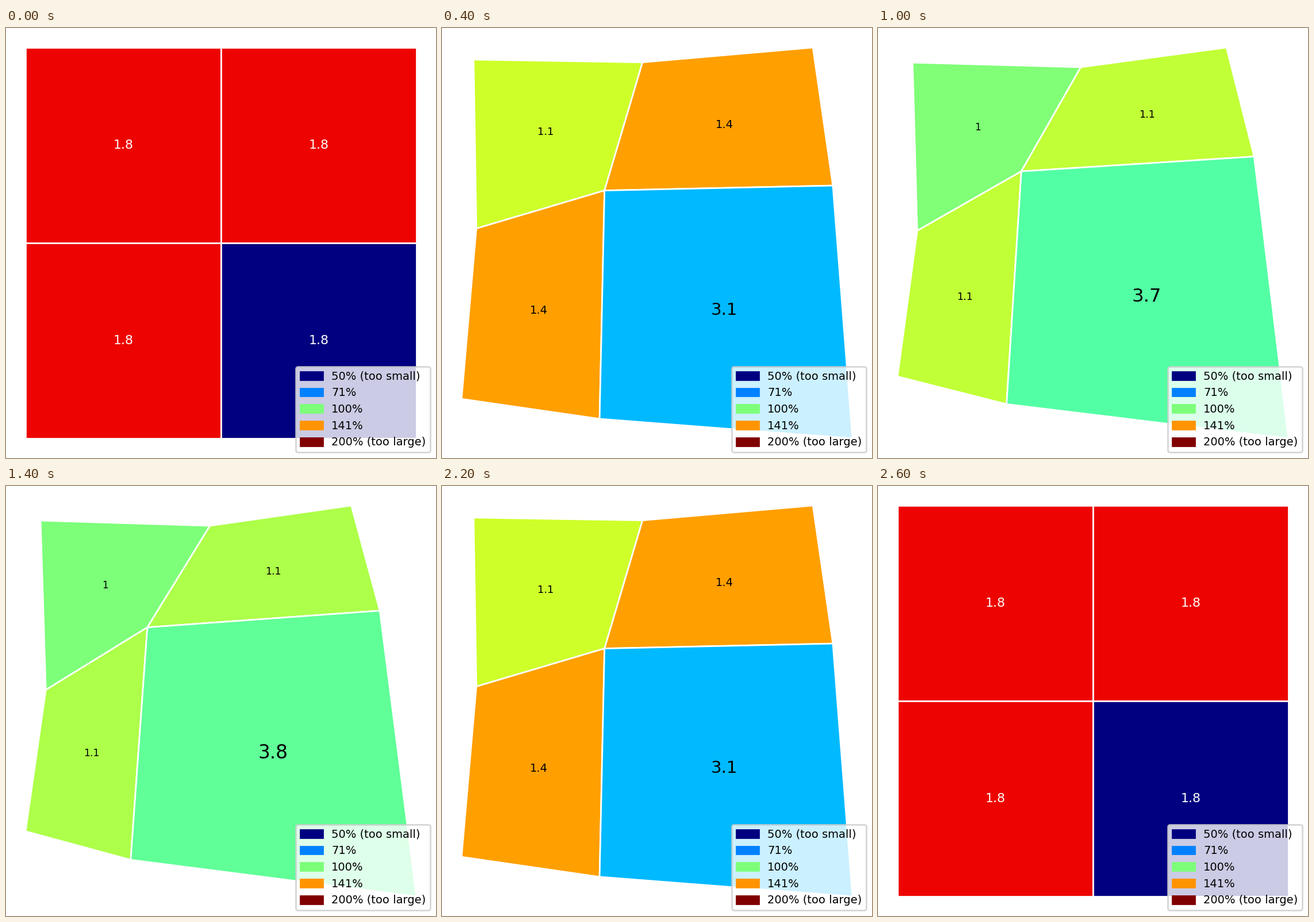
A matplotlib script for the animation above (2.7 s loop, 748 by 748 pixels).

```python
import numpy as np
import matplotlib.pyplot as plt
from matplotlib.animation import FuncAnimation
from matplotlib.patches import Patch, Polygon

plt.rcParams["font.family"] = "DejaVu Sans"

SIZE, DPI = 748, 200
STEPS = 13
WEIGHTS = np.array([1, 1, 1, 4])

# 3 x 3 grid of shared corners, row by row from the bottom left
GRID = np.array([(x, y) for y in (-1, 0, 1) for x in (-1, 0, 1)], float)
# upper left, upper right, lower left, lower right
CELLS = [[c, c + 1, c + 4, c + 3] for c in (3, 4, 0, 1)]


def area_centroid(ring):
    nxt = np.roll(ring, -1, axis=0)
    cross = ring[:, 0] * nxt[:, 1] - nxt[:, 0] * ring[:, 1]
    area = cross.sum() / 2
    return area, ((ring + nxt) * cross[:, None]).sum(axis=0) / (6 * area)


def measure(points):
    areas, centres = zip(*(area_centroid(points[c]) for c in CELLS))
    return np.array(areas), np.array(centres)


def rubber_sheet(points):
    """One iteration of the Dougenik cartogram algorithm."""
    areas, centres = measure(points)
    wanted = areas.sum() * WEIGHTS / WEIGHTS.sum()
    radii = np.sqrt(areas / np.pi)
    masses = np.sqrt(wanted / np.pi) - radii
    error = np.mean(np.maximum(areas, wanted) / np.minimum(areas, wanted))

    delta = points[:, None] - centres[None]
    dist = np.hypot(delta[..., 0], delta[..., 1])
    rel = dist / radii
    force = masses * np.where(rel > 1, 1 / rel, rel**2 * (4 - 3 * rel))
    shift = (delta * (force / dist)[..., None]).sum(axis=1)
    return points + shift / (1 + error)


def colour(level):
    return plt.cm.jet((level + 1) / 2)


states = [GRID]
for _ in range(STEPS):
    states.append(rubber_sheet(states[-1]))

fig = plt.figure(figsize=(SIZE / DPI, SIZE / DPI), dpi=DPI, facecolor="white")
ax = fig.add_axes([0, 0, 1, 1])
ax.axis("off")

shapes = [ax.add_patch(Polygon(GRID[c], ec="white", lw=1)) for c in CELLS]
labels = [ax.text(0, 0, "", ha="center", va="center") for _ in CELLS]

names = ["50% (too small)", "71%", "100%", "141%", "200% (too large)"]
levels = np.linspace(-1, 1, len(names))
ax.legend(
    handles=[Patch(color=colour(v), label=n) for v, n in zip(levels, names)],
    loc="lower right",
    fontsize=7,
)


def draw(i):
    points = states[STEPS - abs(STEPS - i)]
    areas, centres = measure(points)
    values = areas / areas.sum() * WEIGHTS.sum()
    errors = np.log2(values / WEIGHTS)

    for k, (shape, label) in enumerate(zip(shapes, labels)):
        shape.set_xy(points[CELLS[k]])
        shape.set_facecolor(colour(errors[k]))
        label.set_position(centres[k])
        label.set_text(f"{values[k]:.2g}")
        label.set_fontsize(6 * np.sqrt(values[k]))
        label.set_color("white" if abs(errors[k]) > 0.5 else "black")

    low, high = points.min(axis=0), points.max(axis=0)
    pad = 0.05 * (high - low)
    ax.set_xlim(low[0] - pad[0], high[0] + pad[0])
    ax.set_ylim(low[1] - pad[1], high[1] + pad[1])
    return shapes + labels


anim = FuncAnimation(
    fig, draw, frames=2 * STEPS + 1, interval=100, repeat=True, repeat_delay=0
)
plt.show()
```
